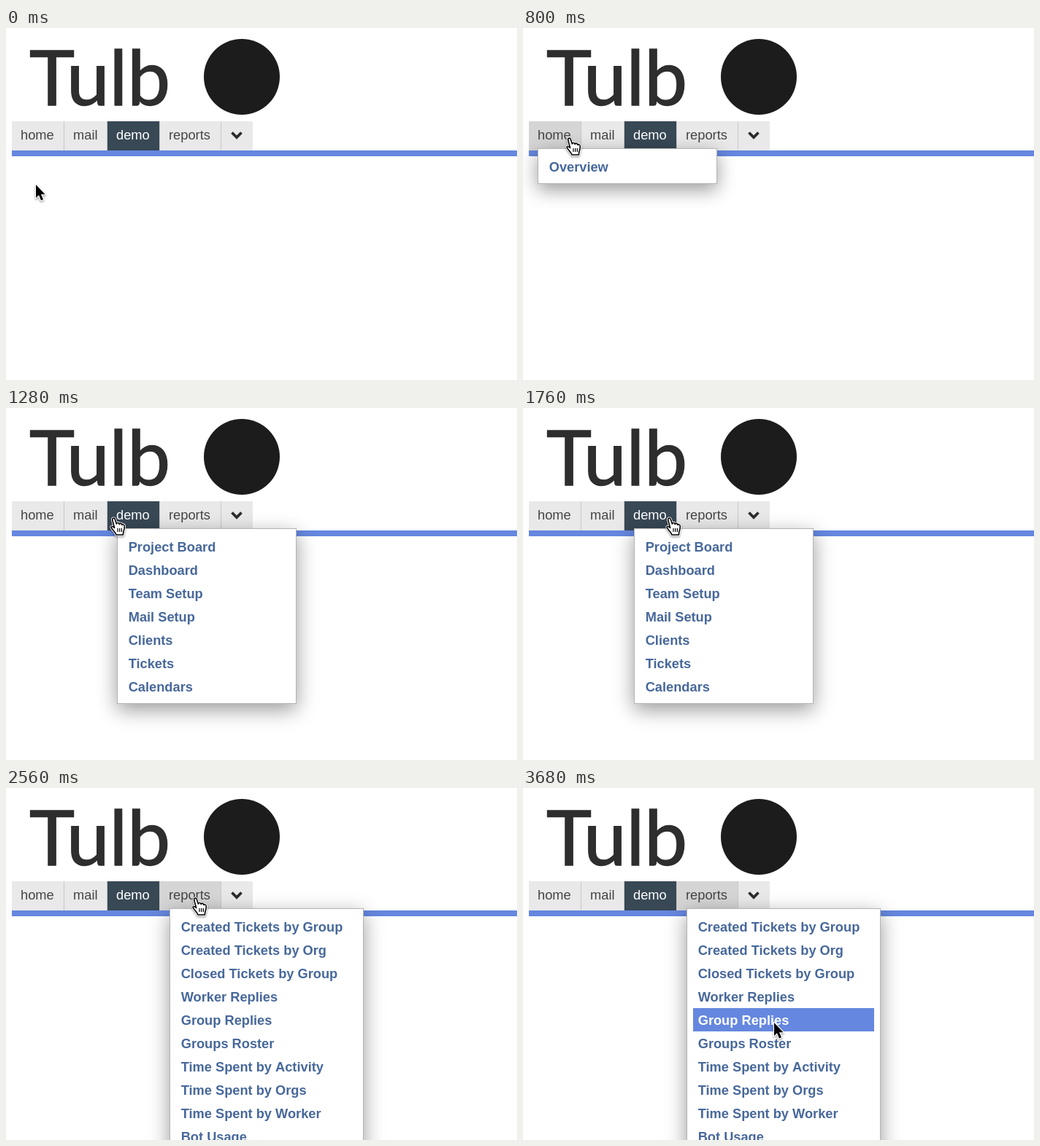
Recreate the animation shown at these times as an HTML page with a canvas. Size 700 by 483 pixels, loop 3840 ms.

```html
<!DOCTYPE html>
<html lang="en">
<head>
<meta charset="utf-8">
<title>Navigation menus</title>
<style>
  html, body { margin: 0; width: 100%; height: 100%; overflow: hidden; background: #fff; }
  canvas { display: block; }
</style>
</head>
<body>
<canvas id="stage" width="700" height="483"></canvas>
<script>
const ctx = document.getElementById('stage').getContext('2d');
const LOOP = 3840, STEP = 160;
const SANS = '"Liberation Sans", Arial, sans-serif';
const BLUE = '#6587df', LINK = '#47689b';

const tabs = [
  { label: 'home', x: 8, w: 71, textX: 20, menuX: 20, menuW: 246, items: ['Overview'] },
  { label: 'mail', x: 80, w: 58, textX: 92, menuX: 92, menuW: 246, items: ['Inbox', 'Sent', 'Drafts'] },
  { label: 'demo', x: 139, w: 71, textX: 151, menuX: 152, menuW: 246, active: true,
    items: ['Project Board', 'Dashboard', 'Team Setup', 'Mail Setup', 'Clients', 'Tickets', 'Calendars'] },
  { label: 'reports', x: 211, w: 83, textX: 223, menuX: 224, menuW: 266,
    items: ['Created Tickets by Group', 'Created Tickets by Org', 'Closed Tickets by Group',
      'Worker Replies', 'Group Replies', 'Groups Roster', 'Time Spent by Activity',
      'Time Spent by Orgs', 'Time Spent by Worker', 'Bot Usage', 'Bot Activity'] },
  { x: 295, w: 43 }
];

// start time, cursor, x, y, open tab, highlighted row
const scenes = [
  [0, 'arrow', 40, 214],
  [160, 'arrow', 36, 196],
  [320, 'hand', 33, 154, 0],
  [480, 'hand', 33, 149, 0],
  [800, 'hand', 57, 149, 0],
  [960, 'hand', 111, 149, 1],
  [1120, 'hand', 118, 149, 1],
  [1280, 'hand', 141, 149, 2],
  [1440, 'hand', 170, 149, 2],
  [1600, 'hand', 171, 149, 2],
  [1760, 'hand', 194, 149, 2],
  [1920, 'hand', 219, 149, 3],
  [2080, 'hand', 240, 149, 3],
  [2240, 'hand', 253, 149, 3],
  [2720, 'hand', 300, 246, 3, 2],
  [2880, 'hand', 330, 307, 3, 4],
  [3680, 'arrow', 343, 321, 3, 4]
];

const arrow = new Path2D('M1 1V19L5 15.3L8 22.5L11 21.3L8 14.2H13.6Z');
const hand = new Path2D('M7.6 15.5L4.8 5C4 2 7.5 1 8.4 4L10.4 10C10.5 8 14 8 14.2 10.4' +
  'C15 8.8 17.8 9 18 11.4C19 10.4 21.4 11 21.3 13.4C21.4 17 20.5 19 19.8 21L19.4 25H9.8' +
  'C9.5 22 6 19.5 3.5 15.8C2 13.5 4.5 12.3 7.6 15.5Z');
const creases = new Path2D('M12 16V21M14.7 16V21M17.4 16V21');

function box(x, y, w, h, color) {
  ctx.fillStyle = color;
  ctx.fillRect(x, y, w, h);
}

function text(str, x, y, font, color) {
  ctx.font = font;
  ctx.fillStyle = color;
  ctx.fillText(str, x, y);
}

function stroke(path, color, width) {
  ctx.strokeStyle = color;
  ctx.lineWidth = width;
  ctx.stroke(path);
}

function shadow(alpha, blur, offset) {
  ctx.shadowColor = `rgba(0,0,0,${alpha})`;
  ctx.shadowBlur = blur;
  ctx.shadowOffsetY = offset;
}

function drawHeader(open) {
  text('Tulb', 32, 106, '105px Lato, sans-serif', '#2e2e2e');
  ctx.strokeStyle = '#2e2e2e';
  ctx.lineWidth = 1.5;
  ctx.strokeText('Tulb', 32, 106);
  ctx.fillStyle = '#1c1c1c';
  ctx.beginPath();
  ctx.arc(323, 67, 52, 0, Math.PI * 2);
  ctx.fill();

  box(8, 128, 330, 40, '#c8c8c8');
  tabs.forEach((tab, i) => {
    const color = tab.active ? '#384855' : i === open ? '#d5d5d5' : '#e9e9e9';
    box(tab.x, 128, tab.w, 40, color);
    if (tab.label) text(tab.label, tab.textX, 153, `18.3px ${SANS}`, tab.active ? '#fff' : '#444');
  });
  stroke(new Path2D('M309.5 143.5L316 150L322.5 143.5'), '#2b2b2b', 3.8);
  box(8, 168, 692, 8, BLUE);
}

function drawMenu({ menuX, menuW, items }, row) {
  const height = items.length * 32 + 17;
  ctx.save();
  shadow(0.4, 26, 8);
  box(menuX, 165, menuW, height, '#b4b4b4');
  ctx.restore();
  box(menuX + 1, 166, menuW - 2, height - 2, '#fff');
  items.forEach((item, i) => {
    const selected = i === row;
    if (selected) box(menuX + 9, 174 + i * 32, menuW - 18, 32, BLUE);
    text(item, menuX + 15.7, 197 + i * 32, `bold 18.24px ${SANS}`, selected ? '#fff' : LINK);
  });
}

function drawCursor(kind, x, y) {
  const isHand = kind === 'hand';
  const shape = isHand ? hand : arrow;
  ctx.save();
  ctx.translate(x, y);
  ctx.lineJoin = 'round';
  shadow(0.4, 3, 1.5);
  stroke(shape, '#fff', isHand ? 3.4 : 2.4);
  ctx.shadowColor = 'transparent';
  ctx.fillStyle = isHand ? '#fff' : '#000';
  ctx.fill(shape);
  if (isHand) {
    stroke(shape, '#000', 1.6);
    stroke(creases, '#000', 1.2);
  }
  ctx.restore();
}

function render(now) {
  const time = Math.floor((now % LOOP) / STEP) * STEP;
  const [, cursor, x, y, open, row] = scenes.filter(scene => scene[0] <= time).pop();
  box(0, 0, 700, 483, '#fff');
  drawHeader(open);
  if (open !== undefined) drawMenu(tabs[open], row);
  drawCursor(cursor, x, y);
}

const start = performance.now();
function tick() {
  render(performance.now() - start);
  requestAnimationFrame(tick);
}
tick();
</script>
</body>
</html>
```
